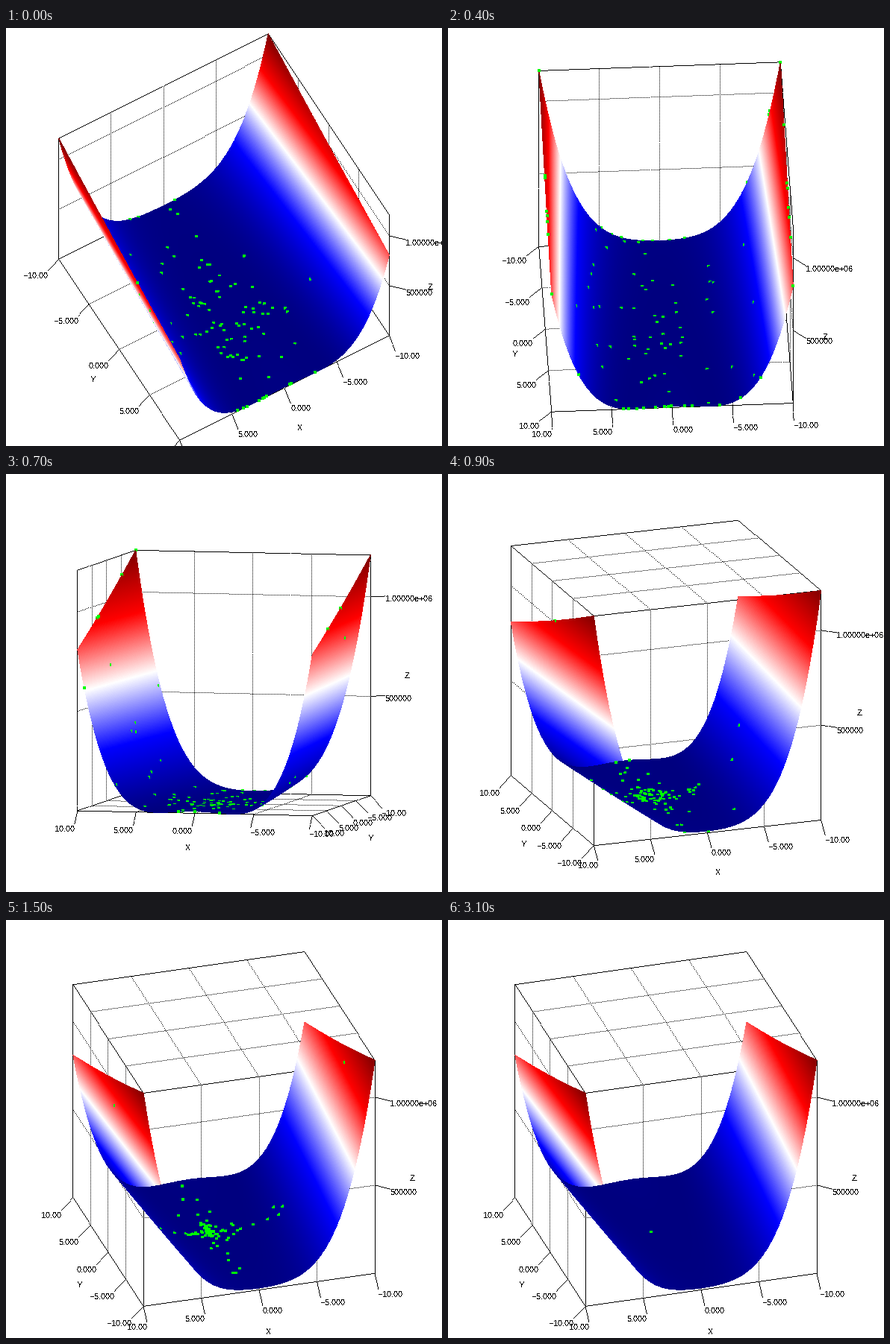
Recreate the animation shown at these times as a matplotlib script. Size 584 by 561 pixels, loop 3200 ms.

```python
import numpy as np
import matplotlib.pyplot as plt
from matplotlib.animation import FuncAnimation
from matplotlib.colors import LinearSegmentedColormap

plt.rcParams.update({"text.antialiased": False, "text.hinting": "default",
                     "text.hinting_factor": 1, "font.family": "Liberation Sans"})

W, H, DPI = 584, 561, 64
FRAMES, STEP = 32, 100
SIDE = 324            # edge of the plot cube in pixels
TOP = 1.21e6          # largest function value
TICK = 0.05           # tick length as a share of the cube edge
GREEN = (0, 255, 0, 255)
BLACK = (0, 0, 0, 255)

RAMP = LinearSegmentedColormap.from_list(
    "ramp", [(0, 0, 0.5), (0, 0, 1), (1, 1, 1), (1, 0, 0), (0.5, 0, 0)], N=512)

# frame, azimuth, elevation, and the speeds of both
CAMERA = np.array([(0, 30, 60, -7, -2), (4, 3, 43.3, -6.3, -8.5),
                   (7, -13.9, 4.9, -4.5, -13), (9, -20, -18, -1, -9),
                   (11, -16.9, -28, 0, 0)], float)

# frame, log of the typical distance to the optimum, spread of that log
SWARM = np.array([(0, 0.7, 0.9), (4, 1.1, 1.3), (7, 0.6, 1.2), (9, -0.2, 1.2),
                  (15, -1.3, 1.7), (23, -5, 2.6), (30, -8, 3), (31, -14, 1)])

# one draw of distances and directions for every frame
rng = np.random.default_rng(5)
NOISE = rng.normal(size=(FRAMES, 2, 100))
SIGNS = np.sign(rng.uniform(-1, 1, size=(FRAMES, 2, 100)))

LENGTHS = ["10.00", "5.000", "0.000", "\u22125.000", "\u221210.00"]
TICKS = [
    (np.linspace(-0.5, 0.5, 5), LENGTHS),
    (np.linspace(0.5, -0.5, 5), LENGTHS),
    (np.array([5e5, 1e6]) / TOP - 0.5, ["500000", "1.00000e+06"]),
]


def rosenbrock(x, y):
    return 100 * (y - x**2)**2 + (1 - x)**2


def to_cube(x, y):
    return -x / 20, y / 20, rosenbrock(x, y) / TOP - 0.5


def camera(n):
    """Azimuth and elevation in radians, by cubic Hermite pieces."""
    n = min(n, CAMERA[-1, 0])
    i = min(np.searchsorted(CAMERA[:, 0], n, side="right"), len(CAMERA) - 1)
    a, b = CAMERA[i - 1], CAMERA[i]
    span = b[0] - a[0]
    t = (n - a[0]) / span
    pose = ((1 + 2 * t) * (1 - t)**2 * a[1:3] + t * (1 - t)**2 * span * a[3:]
            + t * t * (3 - 2 * t) * b[1:3] + t * t * (t - 1) * span * b[3:])
    return np.radians(pose)


def project(p, pose):
    """Screen x, screen y and nearness of points in the unit cube."""
    u, v, w = p
    (ca, ce), (sa, se) = np.cos(pose), np.sin(pose)
    near = v * ca - u * sa
    return (W / 2 + SIDE * (u * ca + v * sa),
            H / 2 - SIDE * (w * ce - near * se),
            SIDE * (near * ce + w * se))


def draw_line(img, a, b, pose, dotted=False):
    x0, y0, _ = project(a, pose)
    x1, y1, _ = project(b, pose)
    count = int(max(abs(x1 - x0), abs(y1 - y0))) + 1
    x = np.floor(np.linspace(x0, x1, count)).astype(int)
    y = np.floor(np.linspace(y0, y1, count)).astype(int)
    if dotted:
        x, y = x[::2], y[::2]
    ok = (x >= 0) & (x < W) & (y >= 0) & (y < H)
    img[y[ok], x[ok]] = BLACK


def draw_box(img, pose):
    """Edges and grid of the three faces turned away from the viewer."""
    az, el = pose
    back = (0.5 if az > 0 else -0.5, -0.5, -0.5 if el > 0 else 0.5)
    for i in range(3):
        for j in range(3):
            if i == j:
                continue
            k = 3 - i - j
            for t in [*TICKS[j][0], -0.5, 0.5]:
                a = np.zeros(3)
                a[i], a[j], a[k] = back[i], t, -0.5
                b = a.copy()
                b[k] = 0.5
                draw_line(img, a, b, pose, dotted=abs(t) < 0.5)


def draw_axes(img, pose):
    """Tick marks; returns the labels as (x, baseline, text, align)."""
    az, el = pose
    front = 0.5 if el > 0 else -0.5
    low = -0.5 if az * el > 0 else 0.5
    side = 0.5 if az > 0 else -0.5
    edges = [(0, front, -0.5), (low, 0, -0.5), (0.5, side, 0)]
    labels = []
    for axis, edge in enumerate(edges):
        out = np.sign(edge) * TICK
        drop = 7.5 if axis == 2 else 10.5
        for t, text in zip(*TICKS[axis]):
            a = np.array(edge, float)
            a[axis] = t
            draw_line(img, a, a + out, pose)
            x, y, _ = project(a + out, pose)
            labels.append((x, y + drop, text, "right" if x < W / 2 else "left"))
        x, y, _ = project(np.array(edge) + 2.5 * out, pose)
        labels.append((x, y + 6, "XYZ"[axis], "center"))
    return labels


# sine spacing puts more samples on the steep walls
sx, sy = np.meshgrid(10 * np.sin(np.linspace(-np.pi / 2, np.pi / 2, 1700)),
                     np.linspace(-10, 10, 520))
SURFACE = np.array(to_cube(sx.ravel(), sy.ravel()))
SHADES = RAMP(SURFACE[2] + 0.5, bytes=True)


def draw_surface(img, pose):
    x, y, near = project(SURFACE, pose)
    order = np.argsort(near)
    x = np.clip(x[order].astype(int), 0, W - 1)
    y = np.clip(y[order].astype(int), 0, H - 1)
    depth = np.full((H, W), -np.inf)
    depth[y, x] = near[order]
    img[y, x] = SHADES[order]
    return depth


def draw_swarm(img, depth, n, pose):
    mid = np.interp(n, SWARM[:, 0], SWARM[:, 1])
    spread = np.interp(n, SWARM[:, 0], SWARM[:, 2])
    reach = np.exp(mid + spread * NOISE[n])
    reach[1] *= 1.4
    x, y = np.clip(1 + reach * SIGNS[n], -10, 10)
    bias = 0.7 if pose[1] > 0 else 3
    for px, py, near in zip(*project(to_cube(x, y), pose)):
        c, r = max(round(px) - 2, 0), max(round(py) - 2, 0)
        area = np.s_[r:r + 4, c:c + 4]
        img[area][near + bias > depth[area]] = GREEN


scenes = {}


def scene(n):
    key = min(n, int(CAMERA[-1, 0]))
    if key not in scenes:
        pose = camera(key)
        img = np.full((H, W, 4), 255, np.uint8)
        draw_box(img, pose)
        depth = draw_surface(img, pose)
        labels = draw_axes(img, pose)
        scenes[key] = img, depth, labels, pose
    return scenes[key]


fig = plt.figure(figsize=(W / DPI, H / DPI), dpi=DPI, facecolor="white")
ax = fig.add_axes([0, 0, 1, 1])
ax.axis("off")
view = ax.imshow(np.full((H, W, 4), 255, np.uint8), extent=(0, W, H, 0),
                 interpolation="nearest", aspect="auto")
texts = [ax.text(0, 0, "", fontsize=11 * 72 / DPI, va="baseline")
         for _ in range(15)]


def update(n):
    base, depth, labels, pose = scene(n)
    img = base.copy()
    draw_swarm(img, depth, n, pose)
    view.set_data(img)
    for item, (x, y, text, align) in zip(texts, labels):
        item.set(position=(x, y), text=text, ha=align)
    return [view, *texts]


anim = FuncAnimation(fig, update, frames=FRAMES, interval=STEP, repeat=True)
plt.show()
```
